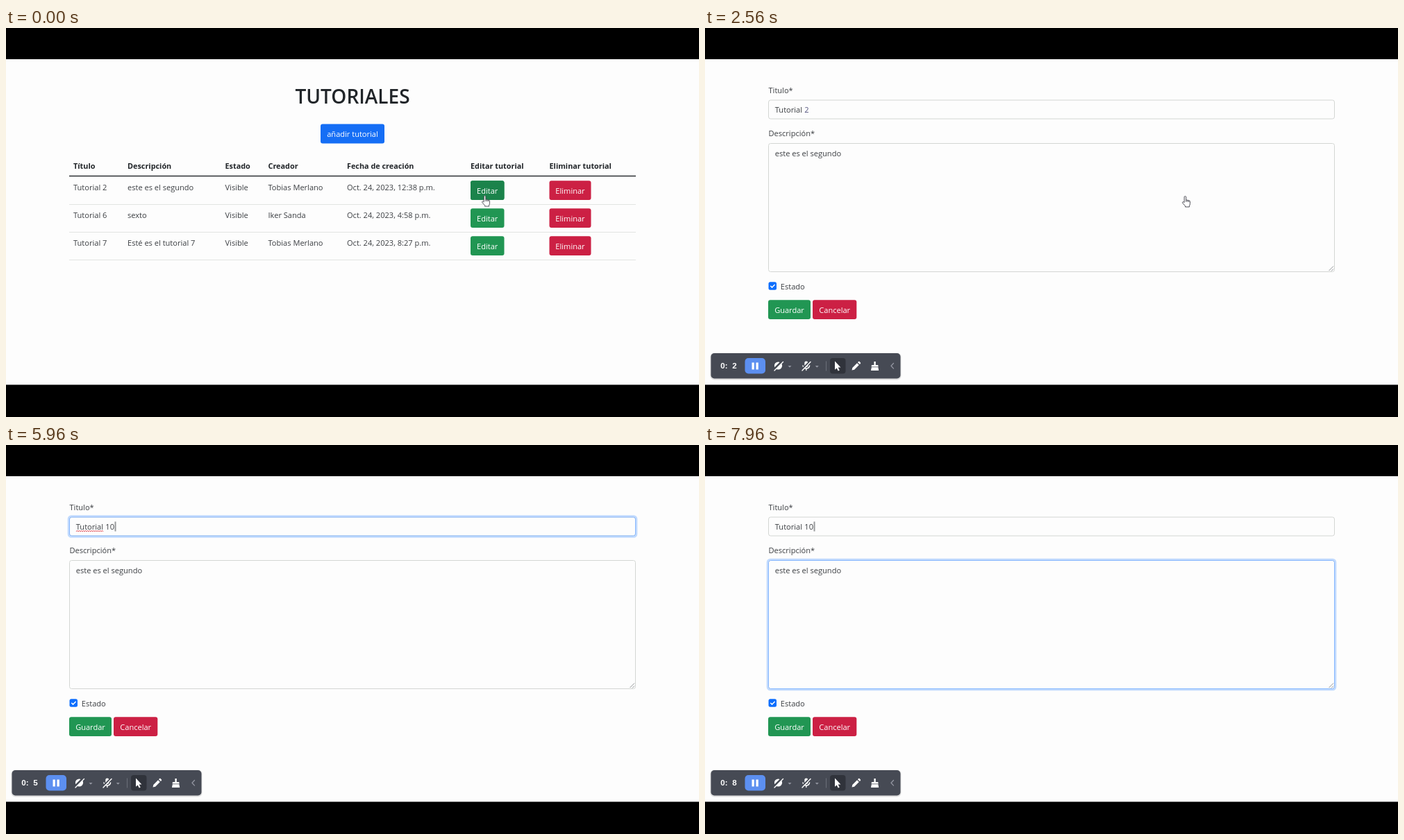
Recreate the animation shown at these times as an HTML page. Size 998x561 px, loop 8000 ms.

```html
<!DOCTYPE html>
<html lang="es">
<head>
<meta charset="utf-8">
<title>Tutoriales</title>
<style>
  html, body { margin: 0; width: 100%; height: 100%; overflow: hidden; background: #000; }
  svg.stage { display: block; width: 100vw; height: 100vh; }
  text { font: 11.07px "Open Sans", "Noto Sans", sans-serif; fill: #3b3e42; }
  .head text { font-size: 10.85px; font-weight: 700; fill: #212529; }
  text.title { font-size: 28px; font-weight: 600; fill: #212529; text-anchor: middle; }
  .btn text { fill: #fff; text-anchor: middle; }
  .green { fill: #219653; }
  .red { fill: #cc2044; }
  .blue { fill: #156ef5; }
  .rule { stroke: #e2e4e2; }
  .box { fill: #fdfdfd; stroke: #d3d6d3; }
  .focus { fill: none; opacity: 0; }
  .focus .ring { stroke: #c2dbfe; stroke-width: 2.6; }
  .focus .edge { stroke: #86b7fe; }
  .bar text { font: 700 11.7px "Liberation Sans", Arial, sans-serif; fill: #fff; }
  .line { fill: none; stroke: #fff; stroke-linecap: round; stroke-linejoin: round; }

  /* One 8 s clock: 1% = 80 ms */
  .step { animation: 8s step-end infinite; }
  .list { animation-name: list; }
  .form { animation-name: form; }
  .bar { animation-name: bar; }
  .seconds { animation-name: seconds; }
  .caret { animation-name: caret; }
  .two { animation-name: two; }
  .one { animation-name: one; }
  .zero { animation-name: zero; }
  .squiggle { animation-name: squiggle; }
  .hand { animation: hand 8s infinite; }
  .hover { animation: hover 8s infinite; }
  .focus-title { animation: focus-title 8s infinite; }
  .focus-text { animation: focus-text 8s infinite; }

  @keyframes list { 0% { visibility: visible } 18.5%, 100% { visibility: hidden } }
  @keyframes form { 0% { visibility: hidden } 18.5%, 100% { visibility: visible } }
  @keyframes bar { 0% { visibility: hidden } 23.5%, 100% { visibility: visible } }
  @keyframes seconds {
    0% { transform: translateY(0) }
    37% { transform: translateY(-20px) }
    49.5% { transform: translateY(-40px) }
    62.5% { transform: translateY(-60px) }
    76% { transform: translateY(-80px) }
    87.5% { transform: translateY(-100px) }
    98.5%, 100% { transform: translateY(-120px) }
  }
  @keyframes caret {
    0% { opacity: 0; transform: translateX(149.5px) }
    45.5% { opacity: 1; transform: translateX(149.5px) }
    47.5% { opacity: 1; transform: translateX(143.5px) }
    54% { opacity: 0; transform: translateX(143.5px) }
    57.5% { opacity: 1; transform: translateX(150.5px) }
    61.5% { opacity: 1; transform: translateX(157.5px) }
    68% { opacity: 0; transform: translateX(157.5px) }
    74.5% { opacity: 1; transform: translateX(157.5px) }
    81% { opacity: 0; transform: translateX(157.5px) }
    87.5%, 100% { opacity: 1; transform: translateX(157.5px) }
  }
  @keyframes two { 0% { opacity: 1 } 47.5%, 100% { opacity: 0 } }
  @keyframes one { 0% { opacity: 0 } 57.5%, 100% { opacity: 1 } }
  @keyframes zero { 0% { opacity: 0 } 61.5%, 100% { opacity: 1 } }
  @keyframes squiggle { 0% { opacity: 0 } 45.5% { opacity: 1 } 93%, 100% { opacity: 0 } }
  @keyframes hand {
    0% { transform: translate(685px, 241.2px); animation-timing-function: ease-out }
    3% { transform: translate(687px, 242px); opacity: 1 }
    34.99% { opacity: 1 }
    35%, 100% { transform: translate(687px, 242px); opacity: 0 }
  }
  @keyframes hover { 0% { fill: #1b834b } 2%, 100% { fill: #1a7a46 } }
  @keyframes focus-title { 0%, 45.5% { opacity: 0 } 47.375%, 93% { opacity: 1 } 94.875%, 100% { opacity: 0 } }
  @keyframes focus-text { 0%, 93% { opacity: 0 } 94.875%, 100% { opacity: 1 } }
</style>
</head>
<body>
<svg class="stage" viewBox="0 0 998 561" preserveAspectRatio="none">
  <rect width="998" height="561"/>
  <rect y="45" width="998" height="469.5" fill="#fdfdfd"/>

  <g class="list step">
    <text class="title" x="499" y="109">TUTORIALES</text>
    <g class="btn">
      <rect class="blue" x="453" y="138.5" width="92" height="28" rx="3"/>
      <text x="499" y="157">añadir tutorial</text>
    </g>
    <g class="head">
      <text x="97" y="203">Título</text>
      <text x="175" y="203">Descripción</text>
      <text x="315.5" y="203">Estado</text>
      <text x="377.5" y="203">Creador</text>
      <text x="491" y="203">Fecha de creación</text>
      <text x="669" y="203">Editar tutorial</text>
      <text x="782.5" y="203">Eliminar tutorial</text>
    </g>
    <path d="M91 213.5H907" stroke="#2b2e32" stroke-width="1.5"/>
    <path class="rule" d="M91 254.5H907M91 294.5H907M91 334.5H907"/>

    <g>
      <text x="97" y="233.5">Tutorial 2</text>
      <text x="175" y="233.5">este es el segundo</text>
      <text x="315.5" y="233.5">Visible</text>
      <text x="377.5" y="233.5">Tobias Merlano</text>
      <text x="491" y="233.5">Oct. 24, 2023, 12:38 p.m.</text>
    </g>
    <g transform="translate(0 40)">
      <text x="97" y="233.5">Tutorial 6</text>
      <text x="175" y="233.5">sexto</text>
      <text x="315.5" y="233.5">Visible</text>
      <text x="377.5" y="233.5">Iker Sanda</text>
      <text x="491" y="233.5">Oct. 24, 2023, 4:58 p.m.</text>
    </g>
    <g transform="translate(0 80)">
      <text x="97" y="233.5">Tutorial 7</text>
      <text x="175" y="233.5">Esté es el tutorial 7</text>
      <text x="315.5" y="233.5">Visible</text>
      <text x="377.5" y="233.5">Tobias Merlano</text>
      <text x="491" y="233.5">Oct. 24, 2023, 8:27 p.m.</text>
    </g>

    <g id="actions" class="btn">
      <rect class="green" x="669" y="220.3" width="48.5" height="27.7" rx="3"/>
      <text x="693.2" y="238.5">Editar</text>
      <rect class="red" x="782.5" y="220.3" width="60" height="27.7" rx="3"/>
      <text x="812.5" y="238.5">Eliminar</text>
    </g>
    <use href="#actions" y="40"/>
    <use href="#actions" y="80"/>
    <g class="btn">
      <rect class="hover" x="669" y="220.3" width="48.5" height="27.7" rx="3"/>
      <text x="693.2" y="238.5">Editar</text>
    </g>
  </g>

  <g class="form step">
    <text x="91.5" y="93.5">Titulo*</text>
    <rect class="box" x="91.5" y="104" width="815" height="27" rx="3"/>
    <g class="focus focus-title">
      <rect class="ring" x="90" y="102.5" width="818" height="30" rx="4"/>
      <rect class="edge" x="91.5" y="104" width="815" height="27" rx="3"/>
    </g>
    <text x="100.8" y="122">Tutorial</text>
    <text class="two step" x="143.2" y="122" style="fill:#52527e">2</text>
    <text class="one step" x="143.2" y="122">1</text>
    <text class="zero step" x="149.8" y="122">0</text>
    <path class="squiggle step" fill="none" stroke="#e2555c" d="M101 125l1.5-1.8 1.5 1.8 1.5-1.8 1.5 1.8 1.5-1.8 1.5 1.8 1.5-1.8 1.5 1.8 1.5-1.8 1.5 1.8 1.5-1.8 1.5 1.8 1.5-1.8 1.5 1.8 1.5-1.8 1.5 1.8 1.5-1.8 1.5 1.8 1.5-1.8 1.5 1.8 1.5-1.8 1.5 1.8 1.5-1.8 1.5 1.8 1.5-1.8 1.5 1.8"/>
    <path class="caret step" d="M0 110.5V124.5" stroke="#33363a"/>

    <text x="91.5" y="156">Descripción*</text>
    <rect class="box" x="91.5" y="166.5" width="815" height="185" rx="3"/>
    <g class="focus focus-text">
      <rect class="ring" x="90" y="165" width="818" height="188" rx="4"/>
      <rect class="edge" x="91.5" y="166.5" width="815" height="185" rx="3"/>
    </g>
    <text x="100.8" y="184.5">este es el segundo</text>
    <path d="M898.5 350l6.500-6.500M902 350.500l3-3" stroke="#85888b" stroke-width=".9"/>

    <rect x="91.500" y="366.300" width="11.500" height="11.500" rx="2.500" fill="#0d6efd"/>
    <path class="line" d="M94.700 372.200l1.900 1.900 3.500-3.700" stroke-width="1.500"/>
    <text x="108.800" y="376.500">Estado</text>
    <g class="btn">
      <rect class="green" x="91" y="392.300" width="61" height="27.700" rx="3"/>
      <text x="121.500" y="410.500">Guardar</text>
      <rect class="red" x="155" y="392.300" width="63.300" height="27.700" rx="3"/>
      <text x="186.700" y="410.500">Cancelar</text>
    </g>
  </g>

  <g class="bar step">
    <rect x="7.500" y="468.500" width="275" height="39" rx="6" opacity=".12"/>
    <rect x="8.500" y="469" width="273" height="36.500" rx="5" fill="#464a54"/>
    <text x="22.300" y="491">0:</text>
    <svg x="36" y="478" width="14" height="18" overflow="hidden">
      <g class="seconds step">
        <text x="3.300" y="13">2</text>
        <text x="3.300" y="33">3</text>
        <text x="3.300" y="53">4</text>
        <text x="3.300" y="73">5</text>
        <text x="3.300" y="93">6</text>
        <text x="3.300" y="113">7</text>
        <text x="3.300" y="133">8</text>
      </g>
    </svg>
    <rect x="57.500" y="476" width="29.500" height="22.500" rx="5" fill="#5c8ff0"/>
    <path d="M67.500 482.500h3.300v10h-3.300zM73.500 482.500h3.300v10h-3.300z" fill="#fff"/>

    <!-- camera off -->
    <circle cx="105.500" cy="487" r="5.600" fill="#fff"/>
    <path d="M99.500 492.500L111 481" stroke="#464a54" stroke-width="3.600"/>
    <path class="line" d="M100 494L112.500 481.500" stroke-width="1.400"/>
    <path d="M119.500 487h5l-2.500 2.800zM158.800 487h5l-2.500 2.800z" fill="#9295a0"/>

    <!-- microphone off -->
    <rect x="143.300" y="480.500" width="5" height="8.500" rx="2.500" fill="#fff"/>
    <path class="line" d="M141 487q.8 4 4.800 4t4.800-4M145.800 491v2.500" stroke-width="1.400"/>
    <path d="M139.800 492.500L151 481.300" stroke="#464a54" stroke-width="3"/>
    <path class="line" d="M140 494L152 481.500" stroke-width="1.400"/>
    <path d="M174.500 480.500V494.500" stroke="#6b6f79"/>

    <!-- pointer, pencil, broom, collapse -->
    <rect x="180" y="476" width="22.500" height="22.500" rx="4" fill="#30333b"/>
    <path d="M187 480.500v12.300l2.700-2.400 2 4.200 2-.9-2-4.200h3.700z" fill="#fff"/>
    <path d="M211.500 493.500l.8-3.600 6.700-6.700 2.800 2.800-6.700 6.700zM220 482.200l1.100-1.100q.7-.6 1.400 0l1.400 1.400q.6.700 0 1.400l-1.100 1.100z" fill="#fff"/>
    <path d="M243.400 481h2.400v5h2.700q1 0 1 1v1.500h-9.800v-1.500q0-1 1-1h2.700zM239.800 489.300h9.600l.8 4.700h-11.200z" fill="#fff"/>
    <path class="line" d="M271.500 483.500l-3.500 3.800 3.500 3.800" style="stroke:#9295a0" stroke-width="1.300"/>
  </g>

  <path class="hand" d="M3.200 9.600V1.900a1.300 1.300 0 0 1 2.600 0V6.200q1-.6 2 .3 1.100-.5 1.900.4 1.600-.2 1.800 1.300v3.300q0 1.600-1 2.800v1.700H4.600v-1.400L.9 10.600q-.8-1.200.2-1.800 1-.4 2.100.8zM5.800 6.200v2.600M7.800 6.500v2.300M9.700 6.900v2" fill="#fff" stroke="#3c3c44" stroke-width=".9" stroke-linejoin="round"/>
</svg>
</body>
</html>
```
